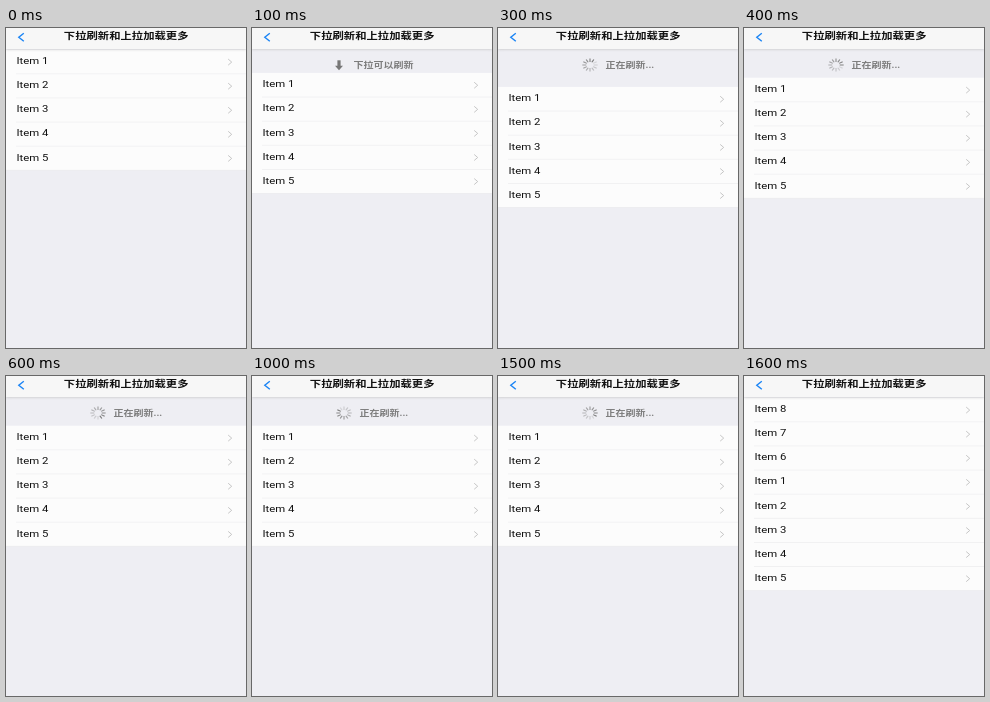
These frames come from a looping animation (240 px wide and 320 px high, 2400 ms). An HTML page with a canvas:

```html
<!DOCTYPE html>
<html lang="zh-CN">
<meta charset="utf-8">
<title>Pull to refresh</title>
<style>
  html, body { margin: 0; width: 100%; height: 100%; overflow: hidden; background: #eeeef3; }
  canvas { display: block; }
</style>
<canvas width="240" height="320"></canvas>
<script>
const ctx = document.querySelector('canvas').getContext('2d');
const LOOP = 2400, STEP = 100;
const TOP = 21.8, ROW = 24.08;
const SCALE_X = 2 / 3, SCALE_Y = 0.56; // the phone screen is squeezed unevenly onto the stage

const lerp = (a, b, k) => a + (b - a) * Math.min(1, Math.max(0, k));

function rect(color, x, y, w, h) {
  ctx.fillStyle = color;
  ctx.fillRect(x, y, w, h);
}

function text(str, x, y, size, weight, color, align = 'left') {
  ctx.save();
  ctx.translate(x, y);
  ctx.scale(SCALE_X, SCALE_Y);
  ctx.font = `${weight} ${size}px Roboto, "Noto Sans CJK SC", "Noto Sans CJK", sans-serif`;
  ctx.textAlign = align;
  ctx.fillStyle = color;
  ctx.fillText(str, 0, 0);
  ctx.restore();
}

function line(color, width, ...points) {
  ctx.strokeStyle = color;
  ctx.lineWidth = width;
  ctx.beginPath();
  points.forEach(([x, y]) => ctx.lineTo(x, y));
  ctx.stroke();
}

function arrow(x, y) {
  rect('#777', x - 1.6, y - 5, 3.2, 6);
  ctx.beginPath();
  ctx.moveTo(x - 4, y + 0.5);
  ctx.lineTo(x + 4, y + 0.5);
  ctx.lineTo(x, y + 5);
  ctx.fill();
}

function spinner(x, y, turn) {
  ctx.save();
  ctx.translate(x, y);
  ctx.scale(SCALE_X, SCALE_Y);
  ctx.rotate(Math.floor(turn * 12) * Math.PI / 6);
  for (let i = 0; i < 12; i++) {
    ctx.globalAlpha = 1 - i * 0.07;
    line('#777', 1.7, [0, -11.5], [0, -5.5]);
    ctx.rotate(-Math.PI / 6);
  }
  ctx.restore();
}

function header() {
  ctx.save();
  ctx.shadowColor = '#bbb';
  ctx.shadowBlur = 3;
  rect('#f7f7f7', 0, -5, 240, 26);
  ctx.restore();
  line('#1a84f5', 1.4, [17.8, 5.2], [12.8, 9.2], [17.8, 13.2]);
  text('下拉刷新和上拉加载更多', 120.2, 11.3, 17, 'bold', '#111', 'center');
}

function list(items, top) {
  rect('#fcfcfc', 0, top, 240, items.length * ROW);
  items.forEach((n, i) => {
    const y = top + i * ROW;
    text('Item ' + n, 10.4, y + 14.4, 17, 400, '#111');
    line('#c0c0c0', 0.9, [222.2, y + 9.3], [225.7, y + 12.3], [222.2, y + 15.3]);
    const last = i === items.length - 1;
    rect('#eaeaec', last ? 0 : 10, y + ROW - 0.3, 240, 0.6);
  });
}

function draw(now) {
  const t = Math.floor(now % LOOP / STEP) * STEP;
  const done = t >= 1600;
  const pull = done ? 0 : t <= 200 ? lerp(0, 46.3, t / 200) : lerp(46.3, 28, (t - 200) / 200);

  rect('#eeeef3', 0, 0, 240, 320);
  if (t > 0 && t <= 200) {
    arrow(87, 37.3);
    text('下拉可以刷新', 101.5, 39.8, 15, 'bold', '#7c7c7c');
  } else if (t > 200 && !done) {
    spinner(92, 37, t / 1000 + 0.85);
    text('正在刷新...', 107.5, 39.8, 15, 'bold', '#7c7c7c');
  }
  list(done ? [8, 7, 6, 1, 2, 3, 4, 5] : [1, 2, 3, 4, 5], TOP + pull);
  header();
}

function tick() {
  draw(performance.now());
  requestAnimationFrame(tick);
}
tick();
</script>
</html>
```
